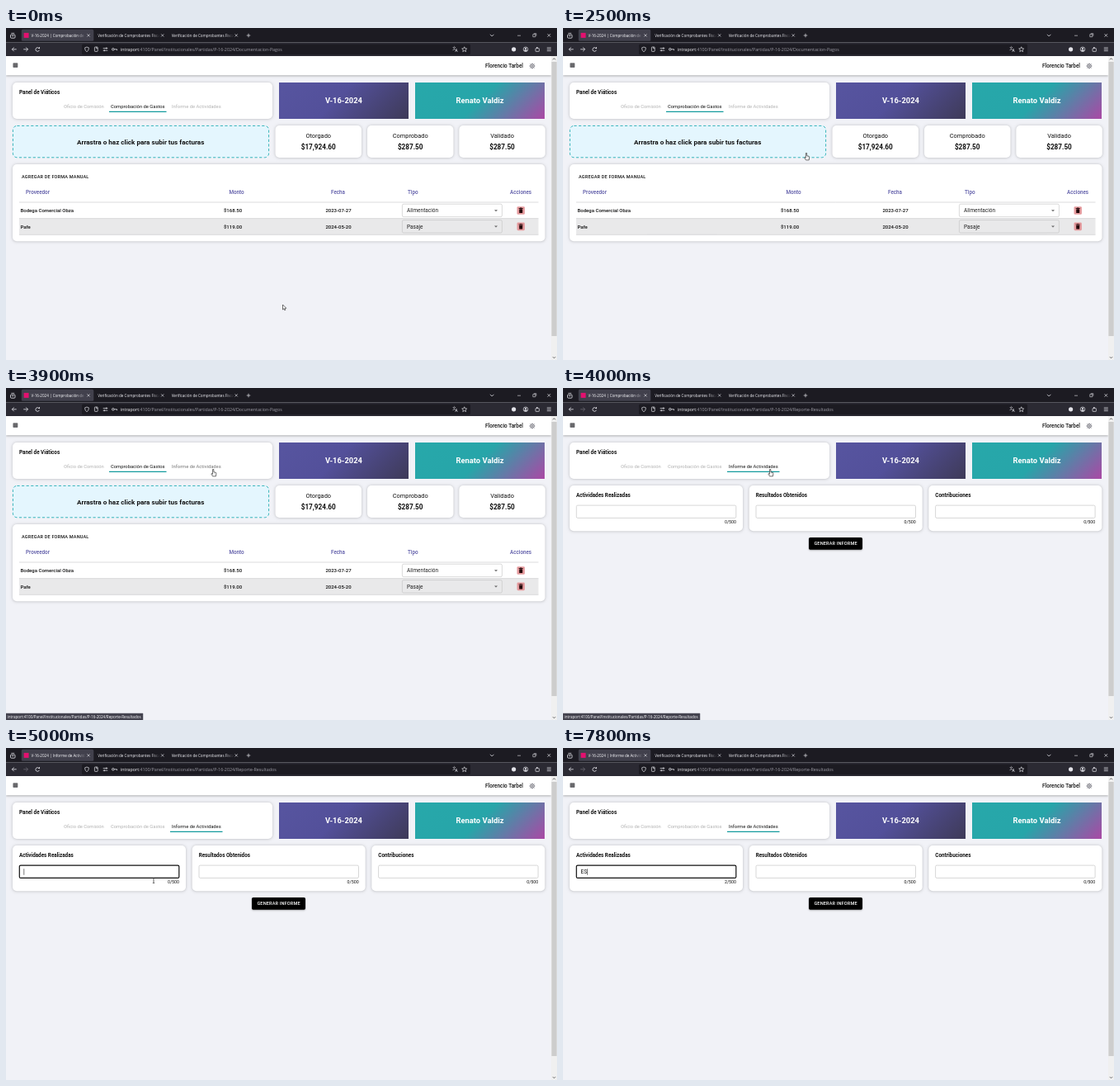
These frames come from a looping animation (668 px wide and 402 px high, 8000 ms). An HTML page with a canvas:

```html
<!DOCTYPE html>
<html lang="es">
<head>
<meta charset="utf-8">
<title>Panel de Viáticos</title>
<style>
html, body { margin: 0; width: 100%; height: 100%; overflow: hidden; background: #f1f2f7; }
canvas { display: block; width: 668px; height: 402px; }
</style>
</head>
<body>
<canvas id="stage"></canvas>
<script>
const W = 668, H = 402, LOOP = 8000;
const canvas = document.getElementById('stage');
const ctx = canvas.getContext('2d');
const ratio = window.devicePixelRatio || 1;
canvas.width = W * ratio;
canvas.height = H * ratio;

const UI = '"Open Sans", "Noto Sans", sans-serif';
const PAGE = 'Roboto, Arial, sans-serif';
const PATH = ':4100/Panel/Institucionales/Partidas/P-16-2024/';
const HOST = 'intraport';
const TABS = [
  ['Oficio de Comisión', 70, 49],
  ['Comprobación de Gastos', 127, 66],
  ['Informe de Actividades', 201, 60]
];

// Pointer path: time, x, y of the hot spot
const ROUTE = [
  [1800, 335.5, 335], [1900, 354.3, 321], [2000, 359, 300], [2200, 350, 240],
  [2400, 315, 175], [2600, 275, 128], [2700, 262, 113], [2800, 252, 103],
  [2900, 247.5, 96.5], [3100, 246.7, 93.7], [3600, 247, 94], [3800, 251.2, 98.5],
  [4000, 251.2, 98.5], [4100, 249, 101], [4300, 225, 130], [4500, 190, 150],
  [4600, 183, 156], [4800, 179, 160.5], [5200, 179, 160.5], [5300, 175.5, 159]
];

function pointerAt(t) {
  if (t <= ROUTE[0][0]) return ROUTE[0].slice(1);
  for (let i = 1; i < ROUTE.length; i++) {
    const [t0, x0, y0] = ROUTE[i - 1], [t1, x1, y1] = ROUTE[i];
    if (t <= t1) {
      const k = (t - t0) / (t1 - t0);
      return [x0 + (x1 - x0) * k, y0 + (y1 - y0) * k];
    }
  }
  return ROUTE[ROUTE.length - 1].slice(1);
}

function rect(x, y, w, h, fill, r = 0) {
  ctx.fillStyle = fill;
  ctx.beginPath();
  ctx.roundRect(x, y, w, h, r);
  ctx.fill();
}

function frame(x, y, w, h, color, width, r = 0) {
  ctx.strokeStyle = color;
  ctx.lineWidth = width;
  ctx.beginPath();
  ctx.roundRect(x, y, w, h, r);
  ctx.stroke();
}

function line(color, width, ...pts) {
  ctx.strokeStyle = color;
  ctx.lineWidth = width;
  ctx.beginPath();
  for (let i = 0; i < pts.length; i += 2) ctx.lineTo(pts[i], pts[i + 1]);
  ctx.stroke();
}

function shape(fill, ...pts) {
  ctx.fillStyle = fill;
  ctx.beginPath();
  for (let i = 0; i < pts.length; i += 2) ctx.lineTo(pts[i], pts[i + 1]);
  ctx.closePath();
  ctx.fill();
}

function arc(x, y, r, color, width, from = 0, to = Math.PI * 2) {
  ctx.strokeStyle = color;
  ctx.lineWidth = width;
  ctx.beginPath();
  ctx.arc(x, y, r, from, to);
  ctx.stroke();
}

// y is the middle of the capitals
function text(s, x, y, size, { color = '#111', weight = 400, family = PAGE, align = 'left', spacing = 0 } = {}) {
  ctx.font = `${weight} ${size}px ${family}`;
  ctx.letterSpacing = spacing + 'px';
  ctx.textAlign = align;
  ctx.fillStyle = color;
  ctx.fillText(s, x, y + size * 0.355);
  return ctx.measureText(s).width;
}

function card(x, y, w, h, r = 5) {
  ctx.save();
  ctx.shadowColor = 'rgba(0,0,0,.24)';
  ctx.shadowBlur = 3.5 * ratio;
  ctx.shadowOffsetY = 0.3 * ratio;
  rect(x, y, w, h, '#fff', r);
  ctx.restore();
}

function fadedTitle(s, x, width, rgb) {
  const g = ctx.createLinearGradient(x + width - 10, 0, x + width, 0);
  g.addColorStop(0, `rgba(${rgb},1)`);
  g.addColorStop(1, `rgba(${rgb},0)`);
  ctx.save();
  ctx.beginPath();
  ctx.rect(x, 0, width, 17);
  ctx.clip();
  text(s, x, 8.9, 4.57, { color: g, family: UI });
  ctx.restore();
}

function cross(x, y, r, color) {
  line(color, 0.7, x - r, y - r, x + r, y + r);
  line(color, 0.7, x + r, y - r, x - r, y + r);
}

function browserIcons(forward) {
  const c = '#e4e4ea';
  frame(5.5, 8, 5.5, 4.2, c, 0.8, 1);
  line(c, 0.7, 6.3, 6.3, 10.2, 6.3);
  line(c, 0.8, 7.3, 9.7, 9.2, 9.7);
  for (const x of [100, 189.7, 279.2]) cross(x, 8.9, 1.6, '#d5d5dc');
  line(c, 0.7, 291.7, 9, 296.3, 9);
  line(c, 0.7, 294, 6.7, 294, 11.3);
  line(c, 0.8, 587, 7.8, 589.2, 10, 591.4, 7.8);
  line(c, 0.6, 620, 9.2, 624, 9.2);
  frame(638.8, 7.7, 3, 3, c, 0.6);
  line(c, 0.6, 639.8, 6.7, 642.8, 6.7, 642.8, 9.6);
  cross(658.3, 8.9, 1.8, c);

  line(c, 0.8, 12.7, 25.8, 7.3, 25.8);
  line(c, 0.8, 9.7, 23.4, 7.3, 25.8, 9.7, 28.2);
  line(forward, 0.8, 21.2, 25.8, 26.6, 25.8);
  line(forward, 0.8, 24.2, 23.4, 26.6, 25.8, 24.2, 28.2);
  arc(38.2, 26, 2.3, c, 0.8, 0.3, 5.4);
  shape(c, 38.8, 25, 41, 25, 41, 22.8);

  ctx.strokeStyle = c;
  ctx.lineWidth = 0.7;
  ctx.beginPath();
  ctx.moveTo(98, 23);
  ctx.lineTo(100.4, 23.9);
  ctx.quadraticCurveTo(100.6, 27.5, 98, 28.8);
  ctx.quadraticCurveTo(95.4, 27.5, 95.6, 23.9);
  ctx.closePath();
  ctx.stroke();
  frame(107.4, 23, 3.8, 5.4, c, 0.7, 0.7);
  line(c, 0.7, 109.6, 23, 109.6, 24.7, 111.2, 24.7);
  line(c, 0.7, 117.7, 24.5, 123.3, 24.5);
  line(c, 0.7, 117.7, 27.2, 123.3, 27.2);
  line(c, 0.8, 121.8, 23.4, 121.8, 25.6);
  line(c, 0.8, 119.2, 26.1, 119.2, 28.3);
  arc(129.8, 25.8, 1.3, c, 0.8);
  line(c, 0.8, 131.1, 25.8, 134.5, 25.8, 134.5, 27.2);

  text('文', 541.2, 24.8, 4.3, { color: c, family: '"Noto Sans CJK SC", "Noto Sans CJK JP", sans-serif' });
  text('A', 544.6, 27, 4.6, { color: c, weight: 600, family: UI });
  ctx.strokeStyle = c;
  ctx.lineWidth = 0.7;
  ctx.beginPath();
  for (let i = 0; i < 10; i++) {
    const a = i * Math.PI / 5 - Math.PI / 2, r = i % 2 ? 1.5 : 3.2;
    ctx.lineTo(555.7 + r * Math.cos(a), 26 + r * Math.sin(a));
  }
  ctx.closePath();
  ctx.stroke();
  ctx.fillStyle = c;
  ctx.beginPath();
  ctx.arc(615.6, 25.8, 2.6, 0, 7);
  ctx.fill();
  arc(630, 25.8, 2.8, c, 0.7);
  ctx.beginPath();
  ctx.arc(630, 25, 1.1, 0, 7);
  ctx.fill();
  rect(628.2, 26.6, 3.6, 1.3, c, 0.6);
  frame(642, 24.6, 4.4, 3.8, c, 0.7, 0.5);
  rect(643, 23, 1.7, 1.7, c, 0.7);
  for (const y of [23.9, 25.8, 27.7]) line(c, 0.7, 655.8, y, 660.8, y);
}

function browser(t) {
  const report = t >= 4000;
  rect(0, 0, W, 17.5, '#1c1b22');
  rect(0, 17.5, W, 16.5, '#2b2a33');
  rect(18.8, 1.8, 87.5, 14, '#42414d', 1.6);
  rect(92, 19.5, 471, 12.7, '#1c1b22', 1.6);
  rect(21.6, 5.9, 6, 6, '#e3106f');
  const page = t >= 4100 ? 'Informe de Actividades' : 'Comprobación de Gastos';
  fadedTitle('V-16-2024 | ' + page, 30.5, 66, '251,251,254');
  for (const x of [111.3, 200.7]) fadedTitle('Verificación de Comprobantes Fiscales', x, 75.5, '240,240,245');
  browserIcons(report ? '#6a6972' : '#e4e4ea');
  const w = text(HOST, 139, 26, 5.32, { color: '#fbfbfe', family: UI });
  const rest = PATH + (report ? 'Reporte-Resultados' : 'Documentacion-Pagos');
  text(rest, 139 + w, 26, 5.32, { color: '#9d9ca5', family: UI });
}

function scrollbar() {
  rect(661, 34, 7, 368, '#f0f0f0');
  rect(661.4, 41, 6.3, 332, '#cdcdcd');
  line('#555', 0.9, 662.9, 38.3, 664.5, 36.7, 666.1, 38.3);
  line('#555', 0.9, 662.9, 398.2, 664.5, 399.8, 666.1, 398.2);
}

function appBar() {
  ctx.save();
  ctx.shadowColor = 'rgba(0,0,0,.35)';
  ctx.shadowBlur = 2.5 * ratio;
  ctx.shadowOffsetY = 0.6 * ratio;
  rect(0, 34, 661, 23.3, '#fff');
  ctx.restore();
  rect(8.5, 42.3, 5.8, 5.6, '#77777b', 0.6);
  for (const y of [43.8, 45.1, 46.4]) line('#4a4a4e', 0.5, 8.7, y, 14.1, y);
  text('Florencio Tarbel', 627, 46, 6.4, { weight: 500, align: 'right' });
  const c = '#4b4b57';
  arc(638, 46, 2.3, c, 0.7);
  arc(638, 46, 0.9, c, 0.6);
  for (let i = 0; i < 8; i++) {
    const a = i * Math.PI / 4, x = Math.cos(a), y = Math.sin(a);
    line(c, 0.9, 638 + 2.4 * x, 46 + 2.4 * y, 638 + 3.3 * x, 46 + 3.3 * y);
  }
}

function banner(x, label, stops) {
  // 135 degree gradient across a 157 x 44 box
  const d = (157 + 44) / 4, cx = x + 78.5, cy = 88;
  const g = ctx.createLinearGradient(cx - d, cy - d, cx + d, cy + d);
  stops.forEach(([k, c]) => g.addColorStop(k, c));
  rect(x, 66, 157, 44, g);
  text(label, cx, 88.1, 9.4, { color: '#fff', weight: 700, align: 'center' });
}

function header(t) {
  const active = t >= 4000 ? 2 : 1;
  card(8, 66, 315, 44);
  text('Panel de Viáticos', 16, 77.3, 6.3, { weight: 700 });
  const hover = Math.round(178 - 62 * Math.min(1, Math.max(0, (t - 3000) / 400)));
  TABS.forEach(([label, x, w], i) => {
    const color = i === active ? '#111' : i === 2 ? `rgb(${hover},${hover},${hover})` : '#b2b2b2';
    text(label, x, 95.3, 5.82, { color });
    if (i === active) rect(x - 2, 100.8, w + 3.5, 1.1, '#139a9d');
  });
  banner(331, 'V-16-2024', [[0, '#5755a0'], [0.45, '#53509a'], [1, '#3e3a58']]);
  banner(496, 'Renato Valdiz', [[0, '#27a8aa'], [0.5, '#27a5a9'], [1, '#ab48a5']]);
}

function total(x, label, value) {
  card(x, 118, 104.5, 39);
  text(label, x + 52.2, 130.3, 7.4, { align: 'center' });
  text(value, x + 52.2, 144, 8.2, { weight: 700, align: 'center' });
}

function trash(y) {
  rect(619.5, y - 4.8, 9.4, 9.6, '#e59a9d', 1.4);
  rect(622.2, y - 1.7, 4, 4.8, '#24090c', 0.6);
  rect(621.7, y - 2.9, 5, 0.9, '#24090c');
  rect(623.3, y - 3.5, 1.8, 0.8, '#24090c');
}

function tableRow(y, name, amount, date, type) {
  const bold = { weight: 500 };
  text(name, 17.5, y, 6, bold);
  text(amount, 275, y, 6, { weight: 500, align: 'center' });
  text(date, 403, y, 6, { weight: 500, align: 'center' });
  frame(480.4, y - 7.8, 121, 15.4, '#c2c2c2', 0.6, 1.6);
  text(type, 486, y - 0.1, 6.5, { color: '#222' });
  shape('#666', 592, y - 0.8, 596, y - 0.8, 594, y + 1.2);
  trash(y);
}

function expenses() {
  rect(8, 118, 311, 39, '#e4f6fe', 5);
  ctx.setLineDash([3.2, 2.4]);
  frame(8.4, 118.4, 310.2, 38.4, '#35b3ba', 1, 5);
  ctx.setLineDash([]);
  text('Arrastra o haz click para subir tus facturas', 163.2, 137.8, 8.1, { weight: 700, align: 'center' });
  total(326.5, 'Otorgado', '$17,924.60');
  total(438, 'Comprobado', '$287.50');
  total(549.3, 'Validado', '$287.50');

  card(8, 165, 645.5, 93.3);
  text('AGREGAR DE FORMA MANUAL', 19, 180.2, 5.5, { weight: 500, spacing: 0.2 });
  [['Proveedor', 24], ['Monto', 270.5], ['Fecha', 394], ['Tipo', 487], ['Acciones', 611]]
    .forEach(([s, x]) => text(s, x, 199, 6.3, { color: '#5a57a6', weight: 500 }));
  rect(16, 230.7, 629.5, 19.5, '#e9e9ea');
  for (const y of [211, 230.6, 250.3]) line('#c4c4c8', 0.6, 16, y, 645.5, y);
  tableRow(221, 'Bodega Comercial Obza', '$168.50', '2023-07-27', 'Alimentación');
  tableRow(240.4, 'Pafe', '$119.00', '2024-05-20', 'Pasaje');
}

function field(x, title, value, state) {
  card(x, 118, 210, 55.3);
  text(title, x + 8, 129.5, 6.3, { weight: 700 });
  const [color, width] = { idle: ['#c6c6c6', 0.7], hover: ['#333', 0.7], focus: ['#111', 1.2] }[state];
  frame(x + 8.3, 142.1, 193.5, 15.3, color, width, 1.5);
  text(value.length + '/500', x + 202, 162.3, 5.3, { align: 'right' });
  return text(value, x + 13.6, 149.9, 6.5);
}

function report(t, hovered) {
  const typed = t >= 7700 ? 'ES' : t >= 7300 ? 'E' : '';
  const focused = t >= 5000;
  const w = field(8, 'Actividades Realizadas', typed, focused ? 'focus' : hovered ? 'hover' : 'idle');
  field(225.7, 'Resultados Obtenidos', '', 'idle');
  field(443.3, 'Contribuciones', '', 'idle');
  const blinkOff = (t >= 5500 && t < 6100) || (t >= 6700 && t < 7200);
  if (focused && !blinkOff) rect(21.6 + w, 146.3, 0.55, 7.5, '#111');

  ctx.save();
  ctx.shadowColor = 'rgba(0,0,0,.35)';
  ctx.shadowBlur = 2 * ratio;
  ctx.shadowOffsetY = 0.7 * ratio;
  rect(298, 181, 65, 14.7, '#000', 1.7);
  ctx.restore();
  text('GENERAR INFORME', 330.6, 188.4, 5.57, { color: '#fff', weight: 500, align: 'center', spacing: 0.16 });
}

function statusBar() {
  rect(0, 394, 166, 8, '#42414d');
  line('#5b5b66', 0.5, 0, 394, 166, 394, 166, 402);
  text(HOST + PATH + 'Reporte-Resultados', 1.6, 398.2, 4.57, { color: '#fbfbfe', family: UI });
}

function drawPointer(kind, x, y) {
  ctx.save();
  ctx.translate(x, y);
  ctx.lineJoin = 'round';
  if (kind === 'beam') {
    line('#222', 0.7, 0, -2.8, 0, 2.8);
    line('#222', 0.6, -1.2, -3, 1.2, -3);
    line('#222', 0.6, -1.2, 3, 1.2, 3);
  } else {
    const pts = kind === 'hand'
      ? [-0.6, 0, 0.6, 0, 0.7, 3.2, 3.3, 3.9, 3.7, 4.8, 3.2, 8.4, -0.5, 8.4, -2.4, 5.5, -1.8, 4.9, -0.7, 5.8]
      : [0, 0, 0, 6, 1.4, 4.8, 2.3, 6.8, 3.2, 6.4, 2.4, 4.4, 4.3, 4.3];
    shape('#fff', ...pts);
    line('#222', 0.65, ...pts, pts[0], pts[1]);
    if (kind === 'hand') line('#555', 0.4, 1.7, 3.7, 1.7, 5.2);
  }
  ctx.restore();
}

function pointerKind(t, x, y) {
  if (t >= 4000 && x > 16 && x < 210 && y > 140) return 'beam';
  const onTab = x > 199 && x < 263 && y > 86 && y < 103;
  const onDrop = t < 4000 && x < 319 && y > 118 && y < 157;
  return onTab || onDrop ? 'hand' : 'arrow';
}

function draw(t) {
  ctx.setTransform(ratio, 0, 0, ratio, 0, 0);
  rect(0, 0, W, H, '#f1f2f7');
  const [x, y] = pointerAt(t);
  const kind = pointerKind(t, x, y);
  appBar();
  header(t);
  if (t < 4000) expenses();
  else report(t, kind === 'beam');
  scrollbar();
  browser(t);
  if (t >= 3700 && t < 4100) statusBar();
  if (t < 7300) drawPointer(kind, x, y);
}

// The screen refreshes ten times a second
function tick() {
  const t = performance.now() % LOOP;
  draw(Math.floor(t / 100) * 100);
  requestAnimationFrame(tick);
}
tick();
</script>
</body>
</html>
```
